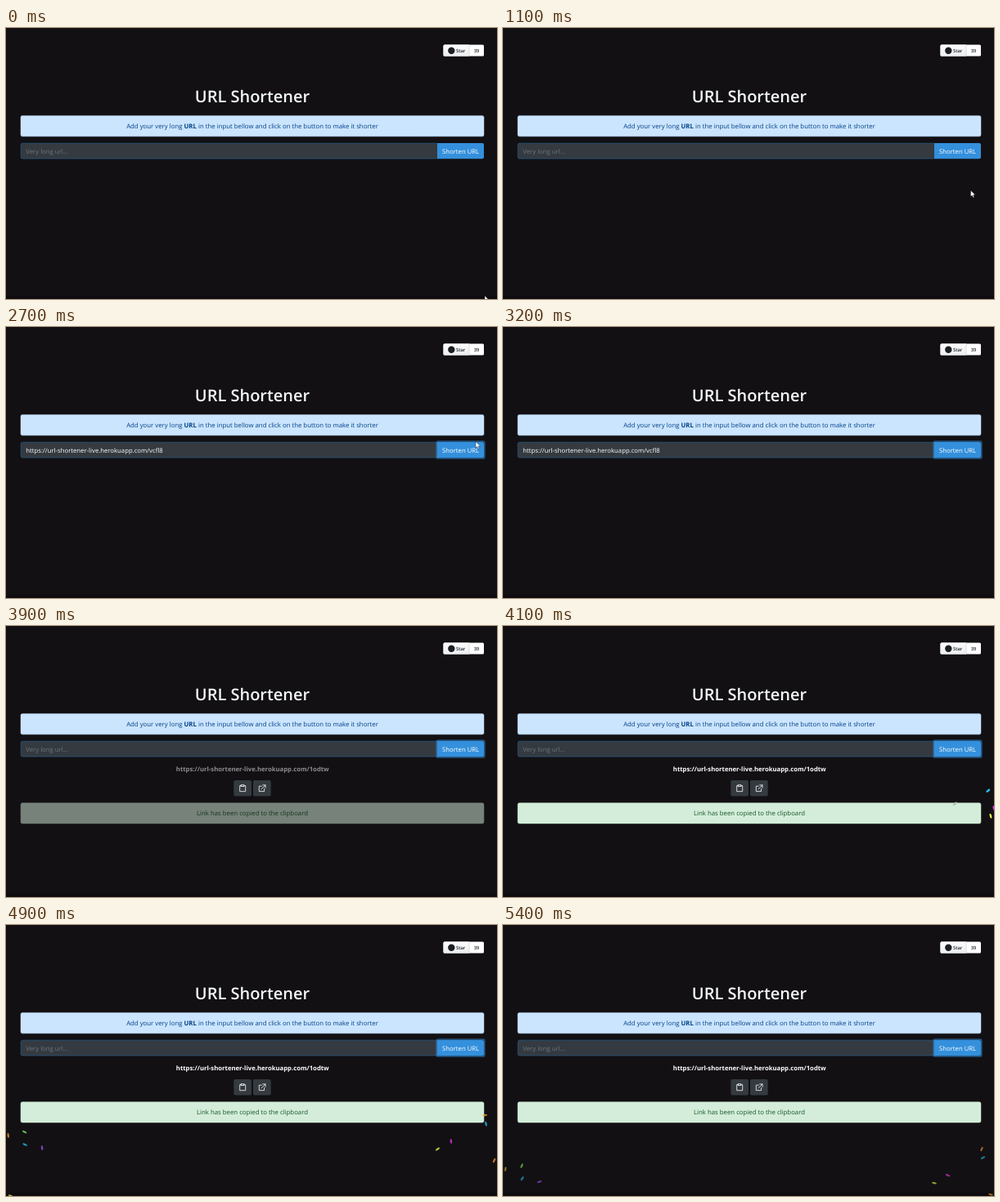
An HTML page for the animation above (5.5 s loop, 600x332 px).

```html
<!DOCTYPE html>
<html lang="en">
<head>
<meta charset="utf-8">
<title>URL Shortener</title>
<style>
  html, body { margin: 0; width: 100%; height: 100%; overflow: hidden; background: #121013; }
  svg { display: block; width: 100%; height: 100%; }
  text {
    font: 7.74px "Open Sans", "Noto Sans", sans-serif;
    text-rendering: geometricPrecision;
    fill: #fff;
  }
  .mid { text-anchor: middle; }
  .title { font-size: 20px; font-weight: 600; fill: #f4f6f8; }
  .info { font-size: 7.8px; fill: #004085; }
  .success { font-size: 7.8px; fill: #155724; }
  .bold { font-weight: 700; }
  .small { font-size: 5.8px; font-weight: 600; fill: #24292e; }
  .hint { fill: #6c757d; }
  .glow { fill: none; stroke: #3490dc; stroke-width: 1.7; stroke-opacity: .55; }
  .icon { fill: none; stroke: #fff; stroke-width: .8; stroke-linejoin: round; stroke-linecap: round; }
</style>
</head>
<body>
<svg viewBox="0 0 600 332" preserveAspectRatio="none">
  <defs>
    <linearGradient id="badge" x2="0" y2="1">
      <stop stop-color="#fcfcfc"/><stop offset="1" stop-color="#eceef0"/>
    </linearGradient>
  </defs>
  <rect width="600" height="332" fill="#121013"/>
  <rect y="328" width="600" height="4" fill="#0e0c0e"/>

  <rect x="534.5" y="20.5" width="49.5" height="14" rx="1.5" fill="#fff"/>
  <path d="M536 20.5H566V34.5H536a1.5 1.5 0 0 1-1.5-1.5V22a1.5 1.5 0 0 1 1.5-1.5Z" fill="url(#badge)"/>
  <path d="M566 20.5V34.5" stroke="#c9cccf" stroke-width=".6"/>
  <circle cx="544.3" cy="27.7" r="4.2" fill="#1b1f23"/>
  <text class="small" x="550" y="29.9">Star</text>
  <text class="small mid" x="575" y="29.9">39</text>

  <text class="title mid" x="301" y="90.8">URL Shortener</text>

  <rect x="18" y="107.4" width="566" height="25.4" rx="2" fill="#cce5ff" stroke="#b8daff" stroke-width=".5"/>
  <text class="info mid" x="301" y="123.1">Add your very long <tspan class="bold">URL</tspan> in the input bellow and click on the button to make it shorter</text>

  <rect id="field" x="18.2" y="141.2" width="510" height="18.8" rx="2" fill="#343a40" stroke="#28608f" stroke-width=".7"/>
  <rect id="fieldGlow" class="glow" x="17.2" y="140.2" width="511" height="20.8" rx="2.6"/>
  <path d="M527 141H582a2 2 0 0 1 2 2V158.2a2 2 0 0 1-2 2H527Z" fill="#3490dc"/>
  <rect id="buttonGlow" class="glow" x="526.2" y="140.2" width="58.6" height="20.8" rx="2"/>
  <text class="mid" x="555.6" y="153.8">Shorten URL</text>
  <text id="hint" class="hint" x="24.3" y="153.8">Very long url...</text>
  <text id="longUrl" x="24.3" y="153.8">https://url-shortener-live.herokuapp.com/vcfl8</text>
  <path id="caret" d="M191.8 146V155.5" stroke="#fff" stroke-width=".7"/>

  <g id="tools">
    <rect x="278.3" y="189" width="21.7" height="19.5" rx="2" fill="#343a40"/>
    <rect x="302" y="189" width="21.7" height="19.5" rx="2" fill="#343a40"/>
    <path class="icon" d="M287.4 195.6H285.7V202.7H292.7V195.6H291M287.4 194.7H291V196.5H287.4Z"/>
    <path class="icon" d="M312.3 196.2H309.3V202.6H315.6V199.4M313.7 194.9H317V198.2M317 194.9L312 199.9"/>
  </g>
  <g id="result">
    <text class="bold mid" x="301.3" y="177.7" style="font-size:7.72px">https://url-shortener-live.herokuapp.com/1odtw</text>
    <rect x="18" y="216.8" width="566" height="25.2" rx="2" fill="#d4edda" stroke="#c3e6cb" stroke-width=".5"/>
    <text class="success mid" x="301" y="232.4">Link has been copied to the clipboard</text>
  </g>

  <g id="confetti"></g>
  <path id="cursor" d="M0 0V7.6L1.8 6L3 8.8L4.3 8.2L3.1 5.6H5.6Z" fill="#fff" stroke="#000" stroke-width=".35"/>
</svg>
<script>
const LOOP = 5500, STEP = 100;
const $ = id => document.getElementById(id);
const show = (id, opacity) => $(id).setAttribute('opacity', Number(opacity));
const clamp = v => Math.max(0, Math.min(1, v));
const during = (t, from, to) => t >= from && t < to;

// Pointer stops: time, x, y
const route = [
  [0, 585, 328], [100, 583, 288], [200, 575, 222], [300, 571.5, 199], [1100, 571.5, 199],
  [1200, 540, 188], [1300, 470, 170], [1400, 412, 156], [1600, 386, 149], [1700, 386, 152],
  [1900, 385.7, 161.5], [2000, 440, 174], [2100, 530, 183], [2200, 576, 184],
  [2300, 574, 168], [2500, 563, 149], [2600, 563, 149], [2800, 585, 132],
  [2900, 585, 150], [3100, 583, 213]
];

function pointerAt(t) {
  const i = route.findIndex(p => p[0] > t);
  if (i < 0) return route[route.length - 1].slice(1);
  const [t0, x0, y0] = route[i - 1], [t1, x1, y1] = route[i];
  const k = (t - t0) / (t1 - t0);
  return [x0 + (x1 - x0) * k, y0 + (y1 - y0) * k];
}

// Each piece: colour, x and y at 4500 ms, remaining drift, remaining lift, angle then, turn until 5400 ms
const pieces = [
  ['#ffa62d', -.5, 230, 3.5, 6, 70, 30],
  ['#88ff5a', 18.5, 222, 4.5, 2, -50, 165],
  ['#26ccff', 19.5, 237.5, 4, 2, -55, 180],
  ['#a25afd', 39.5, 241.5, 5, 2, 20, 145],
  ['#fcff42', 2, 293, 4, -6, -5, 60],
  ['#ffa62d', 586.5, 201.5, -1.5, 2, 75, 220],
  ['#26ccff', 587, 212, -.5, 2, 20, 130],
  ['#b8b8c0', 598.5, 228, 4, 2, 0, 90],
  ['#ff36ff', 548, 233.5, -4.5, 2, -10, 215],
  ['#fcff42', 532.5, 243, -5.5, 2, 110, 80],
  ['#ffa62d', 603, 257, -7, 2, 60, 130]
].map(([color, x, y, drift, lift, angle, turn]) => {
  const el = document.createElementNS('http://www.w3.org/2000/svg', 'ellipse');
  el.setAttribute('rx', 3);
  el.setAttribute('ry', 1.2);
  el.setAttribute('fill', color);
  $('confetti').append(el);
  return { el, x, y, drift, lift, angle, turn };
});

function drawConfetti(t) {
  const ticks = (t - 4500) * .06;
  const speed = .9 ** ticks;
  show('confetti', t < 4000 ? 0 : clamp(.85 - ticks / 200));
  for (const p of pieces) {
    const x = p.x + p.drift * (1 - speed);
    const y = p.y + 1.39 * ticks + p.lift * (speed - 1);
    p.el.setAttribute('transform', `translate(${x} ${y}) rotate(${p.angle + p.turn * ticks / 54})`);
  }
}

function draw(t) {
  const [x, y] = pointerAt(t);
  $('cursor').setAttribute('transform', `translate(${x} ${y})`);
  show('cursor', t < 3200);

  const focused = during(t, 1600, 2500);
  const filled = during(t, 1800, 3800);
  show('fieldGlow', focused ? clamp((t - 1550) / 150) : 0);
  $('field').setAttribute('stroke', focused ? '#3490dc' : '#28608f');
  show('buttonGlow', t >= 2500);
  show('hint', !filled);
  show('longUrl', filled);
  show('caret', during(t, 1800, 2300));

  show('tools', t >= 3800);
  show('result', t < 3800 ? 0 : clamp(.1 + (t - 3800) / 240));
  drawConfetti(t);
}

function tick() {
  const t = performance.now() % LOOP;
  draw(Math.floor(t / STEP) * STEP);
  requestAnimationFrame(tick);
}
tick();
</script>
</body>
</html>
```
